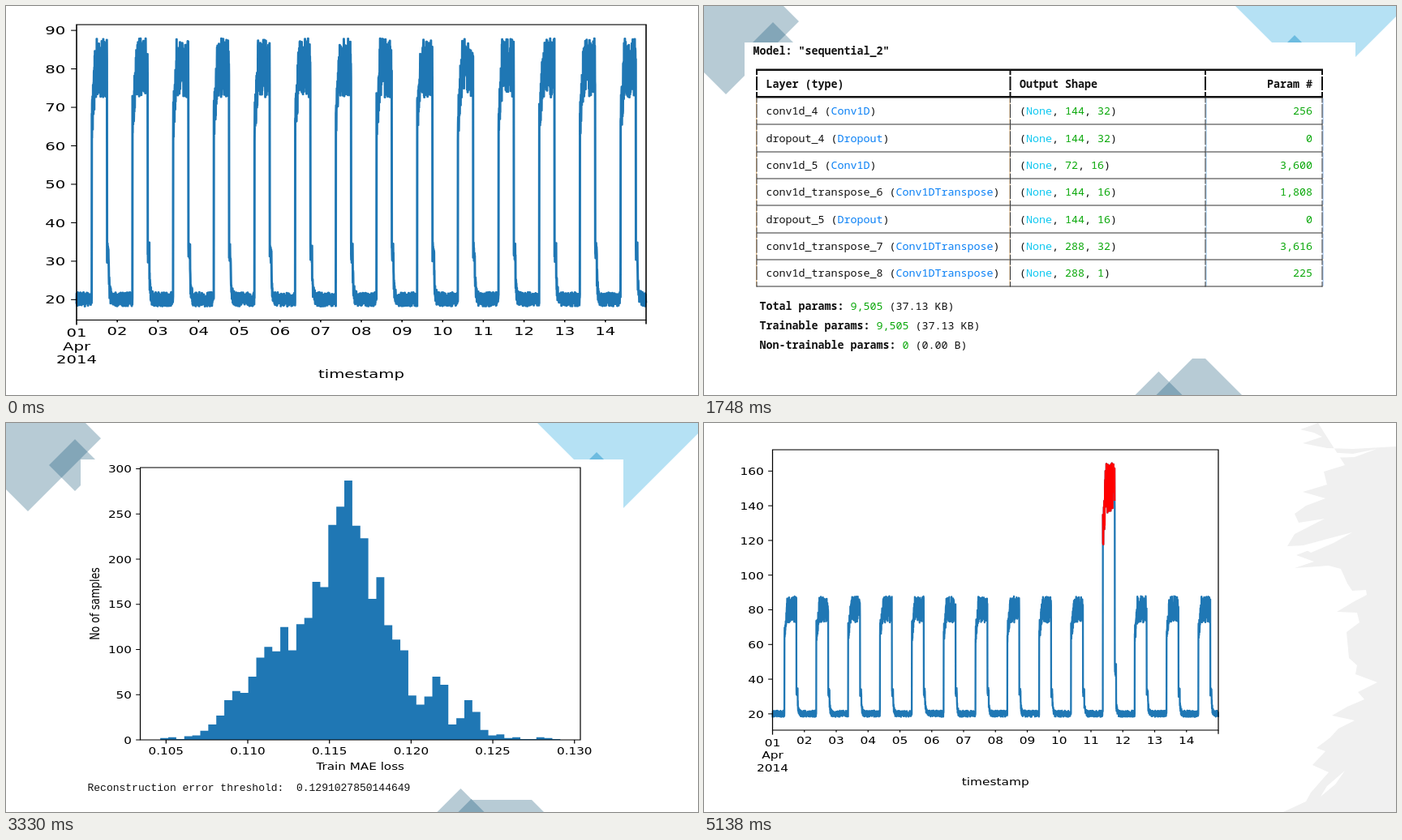
An HTML page for the animation above (5590 ms loop, 853 px wide and 480 px high).

```html
<!DOCTYPE html>
<html lang="en">
<head>
<meta charset="utf-8">
<title>Time series anomaly detection</title>
<style>
  html, body { margin: 0; width: 100%; height: 100%; overflow: hidden; background: #fff; }
  #stage { position: relative; width: 853px; height: 480px; overflow: hidden; }
  #strip { animation: cut 5590ms step-end infinite; }
  svg { display: block; width: 853px; height: 480px; background: #fff; }
  text { white-space: pre; }
  .plot text { font: 13.89px "DejaVu Sans", sans-serif; }
  .axis { fill: none; stroke: #000; stroke-width: 1.11; }
  .line { fill: none; stroke-width: 2.08; stroke-linejoin: round; stroke-linecap: square; }
  .mid { text-anchor: middle; }
  .end { text-anchor: end; }
  .table text { font: 13.34px "Noto Sans Mono", monospace; fill: #111; }
  .table .b { font-weight: 700; }
  .table .type { fill: #0a80f5; }
  .table .none { fill: #12c8f0; }
  .table .num { fill: #0aa80a; }
  .log { font: 13px "Liberation Mono", monospace; fill: #111; }
  @keyframes cut {
    0% { transform: translateY(0); }
    19.141% { transform: translateY(-480px); }
    39.355% { transform: translateY(-960px); }
    59.57% { transform: translateY(-1440px); }
    79.785% { transform: translateY(-1920px); }
    100% { transform: translateY(-1920px); }
  }
</style>
</head>
<body>
<div id="stage"><div id="strip"></div></div>
<script>
const BLUE = '#1f77b4', ORANGE = '#ff7f0e', RED = '#ff0000';
// Axes size of a default 640x480 figure; each plot scales it to its slide.
const W = 496, H = 369.6;
const DAY = 288, DAYS = 14, ON = 108, OFF = 216;

const scene = body => `<svg viewBox="0 0 853 480">${body}</svg>`;
const label = (x, y, s, cls = '') => `<text class="${cls}" x="${x}" y="${y}">${s}</text>`;
const poly = (pts, fill) => `<polygon points="${pts}" fill="${fill}"/>`;
const rect = (x, y, w, h, fill) =>
  `<rect x="${x}" y="${y}" width="${w}" height="${h}" fill="${fill}"/>`;
const range = (n, f) => Array.from({ length: n }, (_, i) => f(i));

function plot([x0, y0, x1, y1], body) {
  return `<g class="plot" transform="translate(${x0} ${y0}) scale(${(x1 - x0) / W} ${(y1 - y0) / H})">
    ${body}<rect class="axis" width="${W}" height="${H}"/></g>`;
}

const scaleX = (lo, hi) => v => (v - lo) / (hi - lo) * W;
const scaleY = (lo, hi) => v => H - (v - lo) / (hi - lo) * H;

function curve(values, sx, sy, color, from = 0) {
  const pts = values.map((v, i) => `${sx(i + from).toFixed(2)},${sy(v).toFixed(2)}`);
  return `<polyline class="line" stroke="${color}" points="${pts.join(' ')}"/>`;
}

const tickX = (x, len) => `<path class="axis" d="M${x} ${H}v${len}"/>`;

const yTicks = (values, sy, digits = 0) => values.map(v =>
  `<path class="axis" d="M0 ${sy(v)}h-4.86"/>` +
  label(-9.7, sy(v) + 5.2, v.toFixed(digits), 'end')).join('');

const xTicks = (values, sx, digits = 0) => values.map(v =>
  tickX(sx(v), 4.86) + label(sx(v), H + 20.2, v.toFixed(digits), 'mid')).join('');

function dateTicks() {
  const days = range(DAYS - 1, i => {
    const x = (i + 1) * W / DAYS;
    return tickX(x, 2.8) + label(x, H + 18.7, String(i + 2).padStart(2, '0'), 'mid');
  }).join('');
  return days + tickX(0, 6) + tickX(W, 5) +
    label(0, H + 21, '01', 'mid') + label(0, H + 37.6, 'Apr', 'mid') +
    label(0, H + 54, '2014', 'mid') + label(W / 2, H + 72.4, 'timestamp', 'mid');
}

function seeded(seed) {
  return () => {
    seed = (seed * 1664525 + 1013904223) % 4294967296;
    return seed / 4294967296;
  };
}

// Quiet night, noisy working hours, short decay in the evening.
function signal(seed, oddDay = -1) {
  const rnd = seeded(seed);
  return range(DAY * DAYS, i => {
    const s = i % DAY, odd = Math.floor(i / DAY) === oddDay;
    let lo = 18.2, hi = 22, gain = 1;
    if (s >= ON && s < OFF) {
      const q = Math.min(1, (s - ON) / 24);
      lo = 60.5 + 12 * q;
      hi = 74 + 14 * q * q;
      if (odd) gain = 1.875;
    } else if (s >= OFF && s < OFF + 12) {
      lo = 29.5;
      hi = 35;
      if (odd) gain = 1.4;
    } else if (s >= OFF) {
      const d = Math.exp((OFF + 12 - s) / 7);
      lo += 5 * d;
      hi += 7 * d;
    }
    return (lo + (hi - lo) * rnd()) * gain;
  });
}

const sampleX = scaleX(0, DAY * DAYS);

function normalDays() {
  const sy = scaleY(14.7, 91.5);
  return plot([87, 23, 789, 387.5],
    curve(signal(7), sampleX, sy, BLUE) +
    yTicks([20, 30, 40, 50, 60, 70, 80, 90], sy) + dateTicks());
}

function anomalyDays() {
  const sy = scaleY(10.6, 172.3), data = signal(19, 10);
  const from = 10 * DAY + ON;
  return torn() + plot([84.5, 33, 634, 379],
    curve(data, sampleX, sy, BLUE) +
    curve(data.slice(from, from + OFF - ON - 1), sampleX, sy, RED, from) +
    yTicks([20, 40, 60, 80, 100, 120, 140, 160], sy) + dateTicks());
}

function losses() {
  const sx = scaleX(-0.55, 11.55), sy = scaleY(-0.0018, 0.5553);
  const train = [.53, .121, .0595, .049, .042, .037, .033, .030, .0278, .026, .0247, .0235];
  const valid = [.282, .053, .040, .0355, .0313, .0297, .0275, .0275, .0285, .0307, .032, .030];
  const key = (y, color, s) =>
    `<path class="line" stroke="${color}" d="M341 ${y}h27.8"/>` + label(379.6, y + 4.8, s);
  return torn() + plot([79, 37, 697.5, 419.5],
    curve(train, sx, sy, BLUE) + curve(valid, sx, sy, ORANGE) +
    xTicks([0, 2, 4, 6, 8, 10], sx) + yTicks([0, .1, .2, .3, .4, .5], sy, 1) +
    `<rect x="335.2" y="6.9" width="154" height="46.2" rx="2.8" fill="#fff" stroke="#ccc" stroke-width="1.3"/>` +
    key(17.8, BLUE, 'Training Loss') + key(38.6, ORANGE, 'Validation Loss'));
}

function histogram() {
  const counts = [2, 3, 1, 4, 5, 10, 17, 27, 44, 54, 52, 70, 91, 103, 98, 125, 99, 128, 135, 175,
    169, 238, 258, 287, 237, 223, 156, 180, 127, 111, 99, 49, 39, 48, 70, 61, 17, 24, 44, 31,
    11, 5, 6, 2, 3, 1, 1, 3, 2, 1];
  const sx = scaleX(.10342, .13036), sy = scaleY(0, 301.35);
  const left = W / 22, step = W / 55;
  const outline = counts.map(n => `V${sy(n).toFixed(2)}h${step.toFixed(4)}`).join('');
  return slide(92, 45, 669, 420) + plot([165.5, 55, 708, 391],
    `<path fill="${BLUE}" d="M${left} ${H}${outline}V${H}z"/>` +
    xTicks([.105, .110, .115, .120, .125, .130], sx, 3) +
    yTicks([0, 50, 100, 150, 200, 250, 300], sy) +
    label(W / 2, H + 40.6, 'Train MAE loss', 'mid') +
    `<text class="mid" transform="translate(-46 ${H / 2}) rotate(-90)">No of samples</text>`) +
    label(100.5, 453.5, 'Reconstruction error threshold:  0.1291027850144649', 'log');
}

// Diamonds in the corners with a white panel over them.
function slide(x, y, w, h) {
  const pale = '#b7cbd5', dark = '#83a6b8';
  return poly('85,20 117,52 85,84 53,52', pale) +
    poly('0,0 98,0 117,19 27,109 0,82', pale) +
    poly('85,20 100.5,35.5 68.5,67.5 53,52', dark) +
    poly('655,0 853,0 853,13 760.5,105.5', '#b5e1f4') +
    poly('728,36 760,68 728,100 696,68', '#6dbce0') +
    poly('610,427 663,480 557,480', pale) +
    rect(x, y, w, h, '#fff') +
    poly('560.5,451 589.5,480 531.5,480', pale) +
    poly('573.5,464 589.5,480 557.5,480', dark);
}

// Ragged brush edge on the right.
function torn() {
  return `<path fill="#f0f0f0" d="M757 0L735 8 752 12 762 17 738 25 768 31 800 32 853 29V480H714
    L742 467 748 456 770 431 750 422 766 405 755 401 772 388 782 377 802 367 774 361 793 350 814 341
    806 332 830 320 803 310 805 299 795 290 792 258 808 246 805 234 780 233 800 221 817 212 816 206
    799 207 793 198 785 180 770 176 728 179 752 171 730 163 764 150 719 152 728 137 765 118 733 123
    728 112 742 102 766 93 738 85 768 76 764 60 790 52z"/>` +
    poly('766,36 800,38 829,32 802,42 772,43', '#fff') +
    poly('735,152 772,142 799,135 776,148 748,160', '#fff') +
    poly('768,448 790,429 778,446 760,461', '#fff');
}

function summary() {
  const cols = [65, 377.5, 618, 762], pitch = 33.35;
  const rows = [
    ['conv1d_4', 'Conv1D', '144', '32', '256'],
    ['dropout_4', 'Dropout', '144', '32', '0'],
    ['conv1d_5', 'Conv1D', '72', '16', '3,600'],
    ['conv1d_transpose_6', 'Conv1DTranspose', '144', '16', '1,808'],
    ['dropout_5', 'Dropout', '144', '16', '0'],
    ['conv1d_transpose_7', 'Conv1DTranspose', '288', '32', '3,616'],
    ['conv1d_transpose_8', 'Conv1DTranspose', '288', '1', '225']
  ];
  const span = (cls, s) => `<tspan class="${cls}">${s}</tspan>`;
  const tints = ['#f0c48c', '#f0c48c', '#8cc4f0', '#8cb8f0'];

  const head = rect(64, 77.5, 699, 2.5, '#111') + rect(64, 111, 699, 2.5, '#111') +
    cols.map(x => rect(x - 1, 78, 2, 7, '#111') + rect(x - 1, 87, 2, 17, '#111') +
      rect(x - 1, 106, 2, 7, '#111')).join('') +
    label(76.6, 101, 'Layer (type)', 'b') + label(389, 101, 'Output Shape', 'b') +
    label(750, 101, 'Param #', 'b end');

  const body = rows.map(([name, type, len, depth, params], i) => {
    const top = 113 + i * pitch, base = 134.3 + i * pitch;
    const bars = cols.map((x, c) =>
      rect(x - (c < 2 ? 1 : -.5), top + 1, 1, pitch - 2, tints[c]) +
      rect(x - .5, top + 8, 1, 17, '#333') +
      rect(x - .5, top + 27, 1, pitch - 27, '#333') +
      rect(x - .5, top, 1, 6.5, '#333')).join('');
    return bars + rect(64.5, Math.round(top + pitch) - .5, 698, 1, '#333') +
      label(76.6, base, `${name} (${span('type', type)})`) +
      label(389, base, `(${span('none', 'None')}, ${span('num', len)}, ${span('num', depth)})`) +
      label(750, base, params, 'num end');
  }).join('');

  const totals = [
    ['Total params:', '9,505', '(37.13 KB)'],
    ['Trainable params:', '9,505', '(37.13 KB)'],
    ['Non-trainable params:', '0', '(0.00 B)']
  ].map(([s, n, size], i) =>
    label(68.5, 375 + i * 24, `${span('b', s)} ${span('num', n)} ${size}`)).join('');

  return slide(50, 45, 753, 390) +
    `<g class="table">${label(60.5, 60, 'Model: "sequential_2"', 'b')}${head}${body}${totals}</g>`;
}

document.getElementById('strip').innerHTML =
  [normalDays, summary, losses, histogram, anomalyDays].map(draw => scene(draw())).join('');
</script>
</body>
</html>
```
